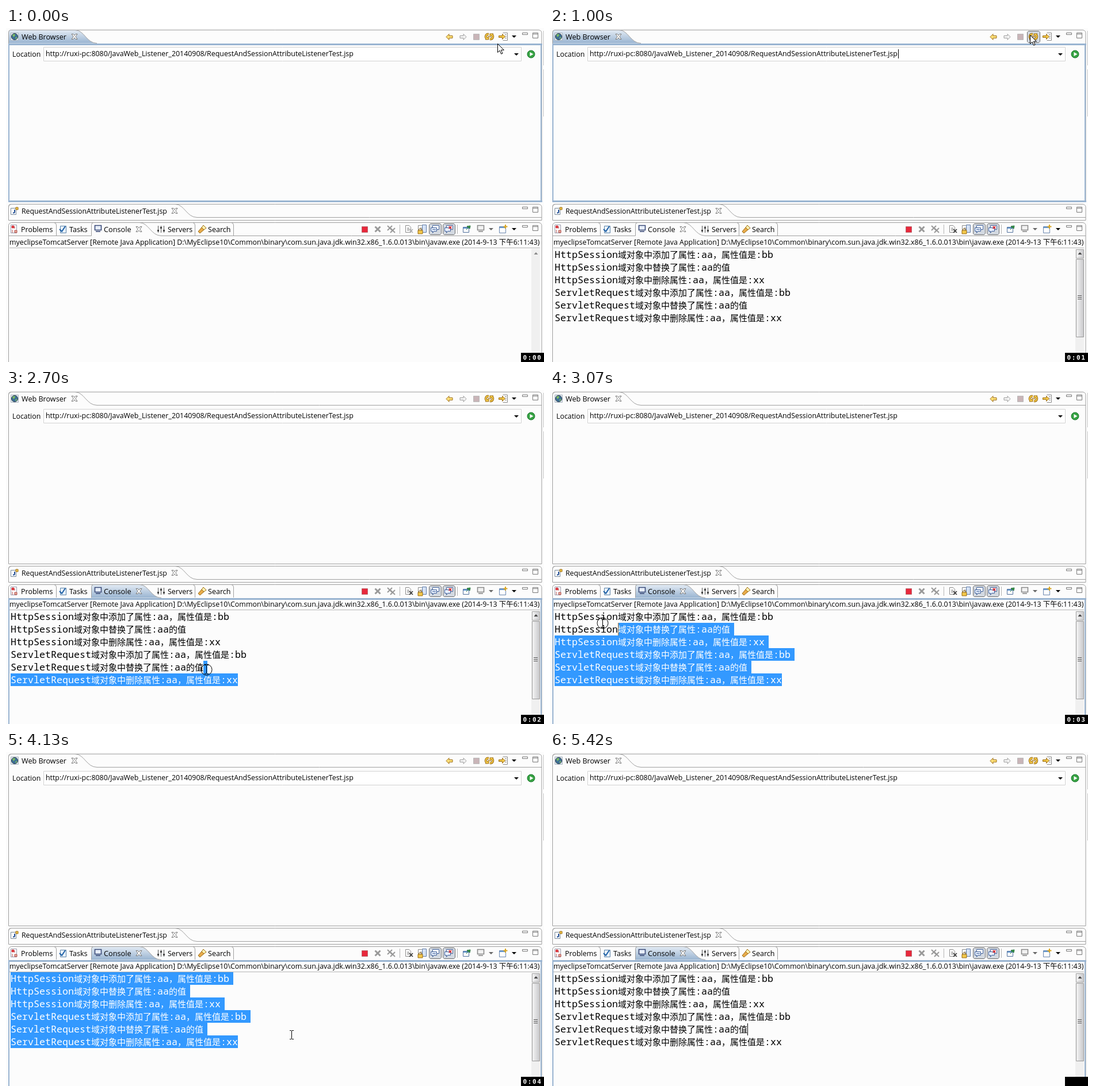
Recreate the animation shown at these times as an HTML page with a canvas. Size 935 by 581 pixels, loop 5570 ms.

```html
<!DOCTYPE html>
<html lang="zh-CN">
<head>
<meta charset="utf-8">
<title>Attribute listener test</title>
<style>
html, body { margin: 0; width: 100%; height: 100%; overflow: hidden; background: #fcfcfc; }
canvas { display: block; }
</style>
</head>
<body>
<canvas id="stage" width="935" height="581"></canvas>
<script>
const ctx = document.getElementById('stage').getContext('2d');
const LOOP = 5570;
const UI = '"Open Sans", "Noto Sans CJK SC", sans-serif';
const BG = '#fcfcfc', GREY = '#a0a0a0', BLUE = '#99b4d1', GOLD = '#f3c94b', BROWN = '#9a6b12';
const LEFT = 8, TOP = 383, ROW = 22, NEWLINE = 7;
const rows = [
  'HttpSession域对象中添加了属性:aa，属性值是:bb',
  'HttpSession域对象中替换了属性:aa的值',
  'HttpSession域对象中删除属性:aa，属性值是:xx',
  'ServletRequest域对象中添加了属性:aa，属性值是:bb',
  'ServletRequest域对象中替换了属性:aa的值',
  'ServletRequest域对象中删除属性:aa，属性值是:xx'
];

const ARROW = 0, BEAM = 1, BEAM_DOWN = 2, ARROW_DOWN = 3, HIDDEN = 4;
// time, x, y, pointer look
const pointer = [
  [0, 854, 27, ARROW], [120, 847, 21, ARROW], [240, 838, 14, ARROW], [360, 834, 12, ARROW],
  [660, 834, 12, ARROW_DOWN], [780, 834, 12, ARROW], [1520, 736, 197, ARROW], [1670, 596, 345, ARROW],
  [1790, 476, 469, BEAM], [1940, 458, 482, BEAM], [2060, 446, 491, BEAM], [2160, 442, 495, BEAM],
  [2310, 440, 497, BEAM], [2460, 428, 503, BEAM], [2580, 413, 506, BEAM_DOWN],
  [2700, 348, 486, BEAM_DOWN], [2820, 265, 462, BEAM_DOWN], [2970, 165, 432, BEAM_DOWN],
  [3070, 91, 405, BEAM_DOWN], [3190, 35, 388, BEAM_DOWN], [3310, 7, 381, BEAM_DOWN],
  [3460, 0, 0, HIDDEN], [3730, 49, 416, BEAM], [3880, 389, 492, BEAM], [4030, 470, 492, BEAM],
  [4130, 496, 492, BEAM], [4250, 496, 492, BEAM_DOWN], [4370, 496, 492, BEAM], [4520, 497, 492, BEAM],
  [4670, 560, 505, BEAM], [4790, 660, 525, BEAM], [4910, 760, 545, BEAM], [5030, 0, 0, HIDDEN]
];
// time, first selected row, x where the selection starts
const selection = [
  [0, 6, 0], [2700, 4, 343], [2820, 3, 263], [2970, 2, 163],
  [3070, 1, 118], [3190, 0, 38], [3310, 0, LEFT], [4370, 6, 0]
];
const at = (keys, t) => keys.findLast(k => k[0] <= t);
const within = (t, from, to) => t >= from && t < to;

function rect(x, y, w, h, color) {
  ctx.fillStyle = color;
  ctx.fillRect(x, y, w, h);
}
function shape(x, y, d, fill, stroke, width = 1) {
  const path = new Path2D(d);
  ctx.save();
  ctx.translate(x, y);
  if (fill) { ctx.fillStyle = fill; ctx.fill(path); }
  if (stroke) { ctx.strokeStyle = stroke; ctx.lineWidth = width; ctx.stroke(path); }
  ctx.restore();
}
function disc(x, y, r, fill, stroke) {
  shape(x, y, `M${-r} 0a${r} ${r} 0 1 0 ${2 * r} 0a${r} ${r} 0 1 0 ${-2 * r} 0z`, fill, stroke);
}
function text(s, x, y, size = 12.5, color = '#000') {
  ctx.font = `${size}px ${UI}`;
  ctx.fillStyle = color;
  ctx.fillText(s, x, y);
}
function gradient(x0, y0, x1, y1, from, to) {
  const g = ctx.createLinearGradient(x0, y0, x1, y1);
  g.addColorStop(0, from);
  g.addColorStop(1, to);
  return g;
}

// Draws one console row, or only measures it; returns its right edge.
function consoleRow(i, color) {
  let x = LEFT;
  for (const run of rows[i].match(/[ -~]+|[^ -~]+/g)) {
    ctx.font = run[0] < '\x7f' ? '16.667px "Noto Sans Mono", monospace' : '15px "Noto Sans CJK SC", sans-serif';
    if (color) { ctx.fillStyle = color; ctx.fillText(run, x, TOP + 17 + ROW * i); }
    x += ctx.measureText(run).width;
  }
  return Math.round(x);
}

function panel(top, bottom, base, tabX, curve, focused) {
  shape(0, 0, `M4.5 ${bottom}V${top + 5}q0-4 5-5H926q5 1 5 5V${bottom}z`, BG, GREY);
  const outline = `M${tabX} ${base}V${top + 4}q0-4 4-4H${curve}c16 0 20 ${base - top} 38 ${base - top}`;
  if (focused) {
    const y = base + .5;
    shape(0, 0, outline + 'z', gradient(0, top, 0, base, '#e3ebf4', BLUE));
    rect(4, y, 928, 3, BLUE);
    rect(4, y, 2, bottom - y, BLUE);
    rect(929, y, 2, bottom - y, BLUE);
    rect(4, bottom - 2.5, 928, 3, BLUE);
  }
  shape(0, 0, outline + (focused ? '' : 'H931'), null, GREY);
  if (!focused) shape(0, 0, `M4 ${base}H${tabX}`, null, GREY);
  shape(897, top + 4.5, 'M.5.5h9v3h-9z', '#fff', '#777');
  shape(915, top + 4.5, 'M.5.5h9v9h-9zM0 2.5h9', '#fff', '#777');
}

const closeMark = (x, y) =>
  shape(x, y, 'M-5-4.5h3l2 2.5 2-2.5h3L1.8 0 5 4.5H2L0 2-2 4.5h-3L-1.8 0z', '#fff', '#777');
const triangle = (x, y, color = '#000') => shape(x, y, 'M-4-2h8L0 2z', color);
const arrowIcon = (x, y, fill, stroke) =>
  shape(x, y, 'M-6 0l5-5v3h6v4h-6v3z', fill, stroke);
const monitor = (x, y, screen, edge) => {
  shape(x, y, 'M-5.5-5.5h11v8h-11z', screen, edge, 1.6);
  shape(x, y, 'M-4 5h8', null, edge, 1.6);
};
const page = (x, y) => shape(x, y, 'M-5.5-6.5h6l3 3v9h-9zM-3-2h4M-3 0h4M-3 2h4', '#fff', '#8b8b8b');
const cross = (x, y, r, color, width) =>
  shape(x, y, `M${-r} ${-r}L${r} ${r}M${r} ${-r}L${-r} ${r}`, null, color, width);
const button = (x, y, w, h) =>
  shape(x, y, `M2.5.5h${w - 5}l2 2v${h - 5}l-2 2H2.5l-2-2v-${h - 5}z`, '#d3d9e1', '#6b6b6b');

function refreshIcon(x, y) {
  const arcs = 'M-1-4C-6-5-8 1-4 4M1 4C6 5 8-1 4-4';
  const heads = 'M-1-1v6h-6zM1 1v-6h6z';
  shape(x, y, arcs, null, BROWN, 4);
  shape(x, y, heads, GOLD, BROWN);
  shape(x, y, arcs, null, GOLD, 2);
}

function browser(t) {
  panel(3.5, 302.5, 26.5, 4.5, 120, t < 2580);
  shape(8, 8, 'M.5.5h13v13H.5z', '#e8ecf0', '#a9b4c0');
  disc(15, 15, 5.5, '#3c6f96', '#345');
  shape(15, 15, 'M-4-3l4-2 1 3-3 3zM1 2l3-2-1 5z', '#7cbb62');
  text('Web Browser', 27, 20, 12.6);
  closeMark(119, 15);

  arrowIcon(771, 15.5, '#ffe27a', BROWN);
  ctx.save();
  ctx.translate(1588, 0);
  ctx.scale(-1, 1);
  arrowIcon(794, 15.5, '#f5f5f5', '#999');
  ctx.restore();
  shape(812, 10, 'M.5.5h10v10h-10z', '#c9b5b8', '#bbb');
  if (within(t, 240, 1670)) button(829, 5, 23, 21);
  refreshIcon(840, 15);
  shape(864, 15, 'M-.5-6.5h8v13h-8M3-3.5h3M4-.5h2M3 2.5h3', '#fff', '#888');
  shape(864, 15, 'M-7.5-1.5h6v-3l5 4.5-5 4.5v-3h-6z', GOLD, BROWN);
  triangle(883, 15);

  text('Location', 11, 50, 12.4);
  shape(65, 33, 'M.5.5h830v24H.5z', '#fff', '#d2d2d2');
  text('http://ruxi-pc:8080/JavaWeb_Listener_20140908/RequestAndSessionAttributeListenerTest.jsp', 69, 49, 12.4);
  if (within(t, 510, 1120) || within(t, 1670, 2310)) rect(605, 37, 1, 16, '#000');
  triangle(887, 46);
  disc(912.5, 45.5, 6.5, '#37a343', '#16752a');
  shape(912.5, 45.5, 'M-2-3.5L4 0l-6 3.5z', '#fff');
}

function editor() {
  panel(306.5, 334.5, 329.5, 4.5, 294, false);
  shape(15, 318, 'M-6.5-4.5h9v11h-9z', '#fff', '#789');
  shape(15, 318, 'M0-2v4q0 2-3 1.5', null, '#234f96', 2);
  shape(15, 318, 'M2-6h4v4H2z', GOLD, BROWN);
  text('RequestAndSessionAttributeListenerTest.jsp', 27, 323, 12.3);
  closeMark(293, 318);
}

function consoleTabs(focused) {
  panel(338.5, 590, 361.5, 148.5, 232, focused);
  shape(0, 0, 'M87.5 361V343q0-4-4-4.5M328.5 361V343q0-4-4-4.5M395.5 361V343q0-4-4-4.5', null, GREY);
  shape(14, 350, 'M-5.5-7.5h10v14h-10z', '#fff', '#99a');
  disc(12, 346, 2.5, '#d8333a');
  shape(14, 350, 'M-3 1v5M1-5v4M1 2h4v4H1z', '#e9ae9a', '#b04a4a');
  shape(99, 350, 'M-4.5-5.5h10v12h-10z', '#e9f2fb', '#5c83a8');
  shape(99, 350, 'M-6 0l4 4 6-9', null, '#1d5fa5', 2);
  monitor(160, 349, '#e7eefb', '#3b4b78');
  shape(269, 350, 'M-4.5-6v12M.5-6v12M5.5-6v12', null, '#555');
  shape(269, 350, 'M-6 1h3v3h-3zM-1-4h3v3h-3zM4 1h3v3H4z', '#444');
  shape(341, 350, 'M-7 4l6-7 4 4-7 6z', '#e8ab4a', BROWN);
  shape(341, 350, 'M-1-3l3-4 5 5-4 3z', '#fff0b0', BROWN);
  text('Problems', 26, 355);
  text('Tasks', 110, 355, 12.6);
  text('Console', 170, 355, 12.7);
  text('Servers', 281, 355);
  text('Search', 351, 355, 12.6);
  closeMark(231, 350);
}

function consoleTools(active) {
  shape(618, 345, 'M.5.5h10v10h-10z', '#e8283c', '#b96a70');
  cross(646, 350, 4.5, '#999', 3);
  cross(667, 348, 4, '#999', 2);
  cross(672, 352, 4, '#999', 2);
  rect(684, 342, 1, 16, '#b5b5b5');
  page(700, 350);
  cross(704, 353, 3, active ? '#333' : '#aaa', 1.6);
  page(722, 350);
  shape(727, 345, 'M-3.5-2.5h7v13h-7z', '#d5e2f5', '#5f7aa5');
  shape(720, 353, 'M-2.5 0v-3q2.5-3 5 0v3', null, BROWN);
  shape(720, 353, 'M-4-1h8v6h-8z', GOLD, BROWN);
  for (const x of [735, 759]) {
    button(x, 340, 22, 20);
    shape(x + 11, 350, 'M-4.5-6.5h11v7h-11z', '#fff', '#3f5f98');
    shape(x + 11, 350, 'M-7.5-2.5h10v6h-5l-2 3v-3h-3z', '#e8f0ff', '#3f5f98');
  }
  cross(772, 347, 2.3, '#d8232a', 1.6);
  rect(741, 350, 6, 1, '#3f5f98');
  rect(784, 342, 1, 16, '#b5b5b5');
  shape(800, 350, 'M-5.5-3.5h10v9h-10z', '#fff', '#51709c');
  shape(800, 350, 'M-5-3h9v2h-9z', '#6a9bd0');
  shape(800, 350, 'M0 1l3-4M1-5l5 4 1-5z', '#3c9a4c', '#24703a');
  monitor(825, 349, '#f2f2f2', '#8a8a8a');
  triangle(843, 350, '#666');
  shape(864, 350, 'M-6.5-4.5h11v11h-11z', '#fff', '#6a86ae');
  shape(864, 350, 'M-6-4H4v2H-6z', '#6a9bd0');
  shape(868, 346, 'M0-4v7M-3.5-.5h7', null, '#d9a520', 2);
  triangle(883, 350);
}

function scrollbar(active) {
  rect(913, 384, 15, 197, '#f0f0f0');
  if (active) {
    const metal = gradient(0, 0, 14, 0, '#f7f7f7', '#c6c6c9');
    shape(914, 385, 'M.5.5h13v15H.5z', metal, '#a3a3a3');
    shape(914, 402, 'M.5.5h13v135H.5z', metal, '#999');
    for (const y of [465, 468, 471]) rect(917, y, 7, 1, '#555');
  }
  shape(921, 392, 'M-3.5 2L0-2l3.5 4z', active ? '#444' : '#888');
}

function consoleText(t) {
  const [, first, startX] = at(selection, t);
  rows.forEach((_, i) => {
    const end = consoleRow(i, '#000');
    if (i < first) return;
    const x = i === first ? startX : LEFT;
    const right = i === rows.length - 1 ? end : end + NEWLINE;
    ctx.save();
    ctx.beginPath();
    ctx.rect(x, TOP + ROW * i, right - x, ROW);
    ctx.clip();
    rect(x, TOP + ROW * i, right - x, ROW, '#39f');
    consoleRow(i, '#fff');
    ctx.restore();
  });
  if (within(t, 2970, 3880)) rect(startX, TOP + ROW * first, 1, ROW, '#d08030');
  if (within(t, 4370, 4790) || t >= 5300) rect(343, 472, 1, 21, '#000');
}

function drawPointer(t) {
  const [, x, y, look] = at(pointer, t);
  if (look === HIDDEN) return;
  if (look === ARROW || look === ARROW_DOWN)
    shape(x + .5, y + .5, 'M0 0v15l3.5-3.3 2.6 6 2.4-1-2.6-5.9h5z', '#fff', '#000');
  else
    shape(x + .5, y + .5, 'M-3.5-8h3M.5-8h3M0-7.5v14M-3.5 7h3M.5 7h3', null, '#000');
  if (look === BEAM_DOWN || look === ARROW_DOWN) disc(x + .5, y + .5, 9.5, null, '#000');
}

function clock(t) {
  rect(895, 565, 40, 16, '#000');
  if (t >= 5420) return;
  ctx.font = 'bold 11px "DejaVu Sans Mono", monospace';
  ctx.letterSpacing = '1.6px';
  ctx.fillStyle = '#fff';
  ctx.fillText('0:0' + Math.floor(t / 1000), 898.5, 577);
  ctx.letterSpacing = '0px';
}

function draw(t) {
  const printed = t >= 780;
  rect(0, 0, 935, 581, BG);
  rect(934, 5, 1, 60, '#c4c4c4');
  rect(934, 72, 1, 82, '#c4c4c4');
  browser(t);
  editor();
  consoleTabs(t >= 2580);
  consoleTools(printed);
  text('myeclipseTomcatServer [Remote Java Application] D:\\MyEclipse10\\Common\\binary\\com.sun.java.jdk.win32.x86_1.6.0.013\\bin\\javaw.exe (2014-9-13 下午6:11:43)', 6, 377, 12.43);
  rect(6, 382, 922, 1, '#b4b4b4');
  scrollbar(printed);
  if (printed) consoleText(t);
  drawPointer(t);
  clock(t);
}

function tick() {
  draw(performance.now() % LOOP);
  requestAnimationFrame(tick);
}
tick();
</script>
</body>
</html>
```
